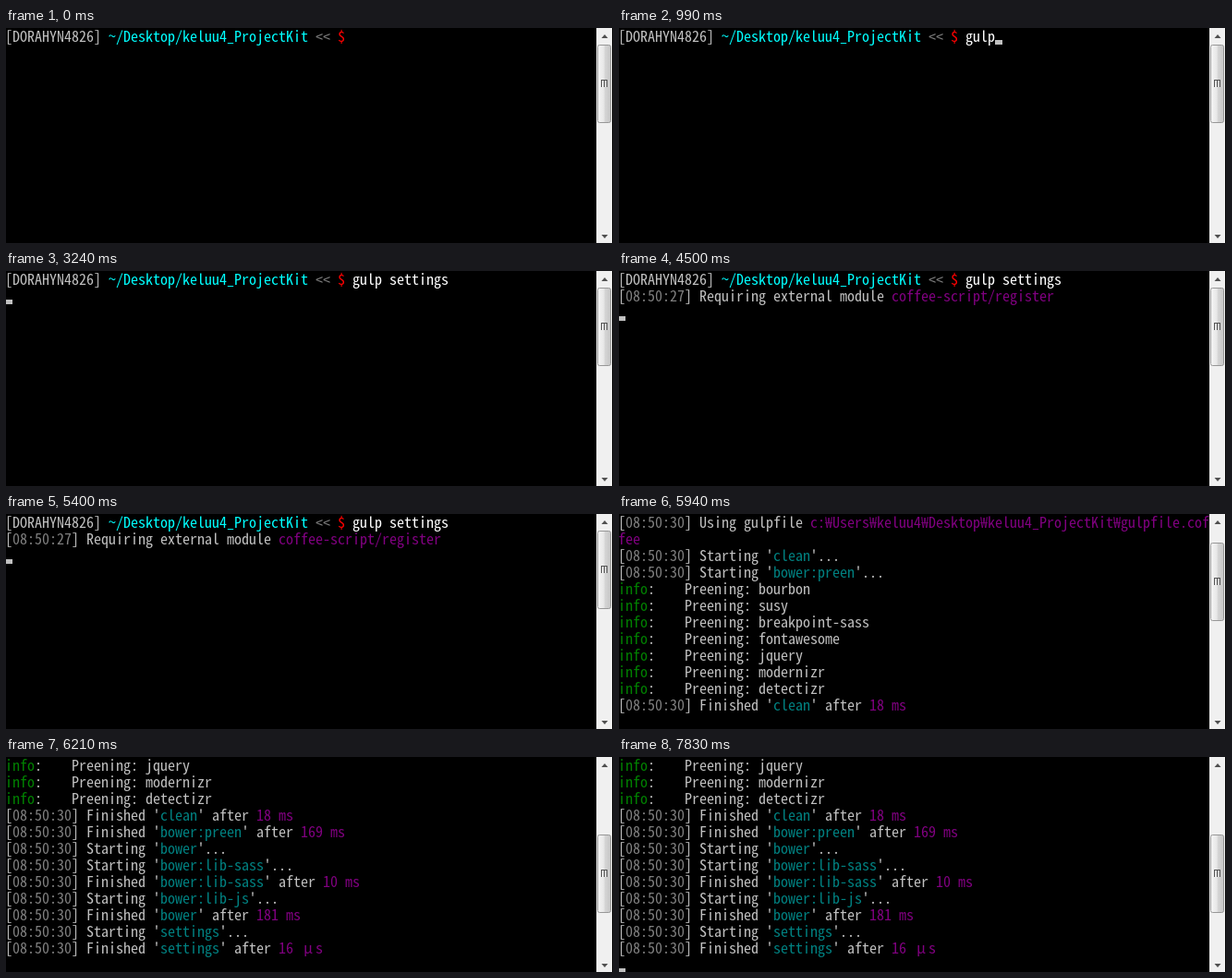
These frames come from a looping animation (657 px wide and 233 px high, 8 s). An HTML page with a canvas:

```html
<!DOCTYPE html>
<html lang="en">
<head>
<meta charset="utf-8">
<title>Terminal</title>
<style>
  html, body { margin: 0; width: 657px; height: 233px; overflow: hidden; background: #000; }
  canvas { display: block; }
</style>
</head>
<body>
<canvas id="stage" width="657" height="233"></canvas>
<script>
const ctx = document.getElementById("stage").getContext("2d");
const LOOP = 8000, CELL = 8, ROW = 18, ROWS_ABOVE_CURSOR = 12;

// "§x" switches to colour x
const COLORS = {
  n: "#c0c0c0", d: "#808080", w: "#fff", c: "#0ff", r: "#f00",
  m: "#800080", t: "#008080", g: "#008000"
};

const stamp = (sec, text) => `[§d08:50:${sec}§n] ${text}`;
const start = task => stamp(30, `Starting '§t${task}§n'...`);
const finish = (task, time) => stamp(30, `Finished '§t${task}§n' after §m${time}`);
const preen = name => `§ginfo§n:    Preening: ${name}`;

const PROMPT = "[DORAHYN4826] §c~/Desktop/keluu4_ProjectKit §d<< §r$ §w";
const PROMPT_LENGTH = PROMPT.replace(/§./g, "").length;

// Each burst of output appears at once
const BURSTS = [
  { time: 3600, lines: [
    stamp(27, "Requiring external module §mcoffee-script/register")
  ] },
  { time: 5940, lines: [
    stamp(30, "Using gulpfile §mc:₩Users₩keluu4₩Desktop₩keluu4_ProjectKit₩gulpfile.cof"),
    "§mfee",
    start("clean"),
    start("bower:preen"),
    ...["bourbon", "susy", "breakpoint-sass", "fontawesome", "jquery", "modernizr", "detectizr"].map(preen),
    finish("clean", "18 ms")
  ] },
  { time: 6120, lines: [
    finish("bower:preen", "169 ms"),
    start("bower"),
    start("bower:lib-sass"),
    finish("bower:lib-sass", "10 ms")
  ] },
  { time: 6210, lines: [
    start("bower:lib-js"),
    finish("bower", "181 ms"),
    start("settings"),
    finish("settings", "16 μs")
  ] }
];

// Evenly paced keystrokes, seen on the next screen refresh
const REFRESH = 90;
const typeWord = (word, from, to) => [...word].map((char, i) => ({
  time: Math.ceil((from + (to - from) * i / (word.length - 1)) / REFRESH) * REFRESH,
  char
}));
const ENTER = 3240;
const KEYS = [
  ...typeWord("gulp ", 270, 1170),
  { time: 1620, char: "" },
  ...typeWord("settings", 2250, 3060),
  { time: ENTER, char: "" }
];

// A steady blink clock; a key shows the cursor, output hides it until it next turns on
const blinks = time => Math.floor((time - 455) / 491) + 1;
function cursorVisible(time, lastKey, lastBurst) {
  const flips = blinks(time) - blinks(Math.max(lastKey, lastBurst));
  return flips % 2 === 0 && (flips > 0 || lastKey > lastBurst);
}

// Choose the size at which one character fills one cell
const font = size => `300 ${size}px "Noto Sans Mono CJK KR", "Noto Sans Mono", "DejaVu Sans Mono", monospace`;
ctx.font = font(100);
const fontSize = 100 * CELL / ctx.measureText("M").width;

function rect(color, x, y, w, h) {
  ctx.fillStyle = color;
  ctx.fillRect(x, y, w, h);
}

function drawLine(line, row) {
  let col = 0;
  ctx.fillStyle = COLORS.n;
  line.split("§").forEach((part, i) => {
    if (i) ctx.fillStyle = COLORS[part[0]];
    for (const char of i ? part.slice(1) : part) {
      const cells = char === "μ" ? 2 : 1;
      ctx.fillText(char, (col + cells / 2) * CELL - 1, row * ROW + 15);
      col += cells;
    }
  });
}

function drawArrow(y, dir) {
  ctx.fillStyle = "#505050";
  ctx.beginPath();
  ctx.moveTo(644.5, y + 2 * dir);
  ctx.lineTo(651.5, y + 2 * dir);
  ctx.lineTo(648, y - 2 * dir);
  ctx.fill();
}

function drawScrollbar(scroll) {
  const top = Math.round(18 + scroll * 6.6);
  rect("#f0f0f0", 639, 0, 17, 233);
  drawArrow(9, 1);
  drawArrow(226, -1);
  const shade = ctx.createLinearGradient(641, 0, 655, 0);
  shade.addColorStop(0, "#f5f5f5");
  shade.addColorStop(0.45, "#e6e6e6");
  shade.addColorStop(0.5, "#d6d6d6");
  shade.addColorStop(1, "#c4c4c4");
  ctx.fillStyle = shade;
  ctx.strokeStyle = "#979797";
  ctx.beginPath();
  ctx.roundRect(640.5, top + 0.5, 14, 84, 2);
  ctx.fill();
  ctx.stroke();
  rect("#555", 644, top + 38, 7, 1);
  for (let x = 644; x <= 650; x += 3) rect("#555", x, top + 38, 1, 8);
}

function draw(time) {
  const past = event => event.time <= time;
  const keys = KEYS.filter(past), bursts = BURSTS.filter(past);
  const typed = keys.map(key => key.char).join("");
  const lines = [PROMPT + typed, ...bursts.flatMap(burst => burst.lines)];
  const cursorRow = time < ENTER ? 0 : lines.length;
  const scroll = Math.max(0, cursorRow - ROWS_ABOVE_CURSOR);

  rect("#000", 0, 0, 657, 233);
  ctx.font = font(fontSize);
  ctx.textAlign = "center";
  lines.slice(scroll).forEach(drawLine);
  if (cursorVisible(time, keys.at(-1)?.time ?? 0, bursts.at(-1)?.time ?? 0)) {
    const col = cursorRow ? 0 : PROMPT_LENGTH + typed.length;
    rect(COLORS.n, col * CELL - 1, (cursorRow - scroll) * ROW + 13, CELL, 5);
  }
  drawScrollbar(scroll);
}

function tick() {
  draw(performance.now() % LOOP);
  requestAnimationFrame(tick);
}
tick();
</script>
</body>
</html>
```
